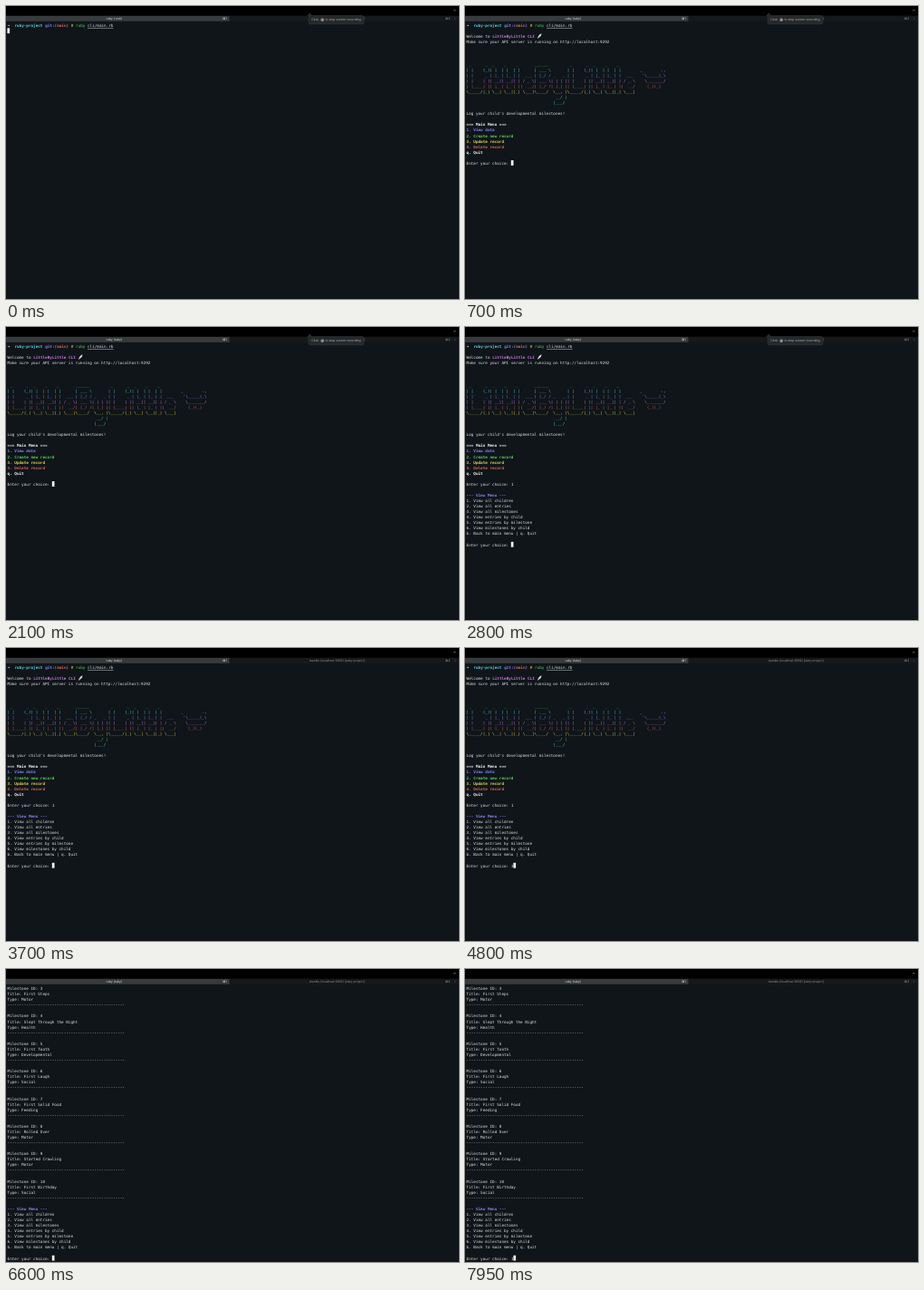
Recreate the animation shown at these times as an HTML page. Size 500 px wide and 323 px high, loop 8 s.

```html
<!DOCTYPE html>
<html lang="en">
<head>
<meta charset="utf-8">
<title>Terminal session</title>
<style>
  html, body { margin: 0; width: 100%; height: 100%; overflow: hidden; background: #0f1519; }
  svg { display: block; width: 100vw; height: 100vh; }
  text { white-space: pre; text-rendering: geometricPrecision; }
  .term { font: 4.319px "DejaVu Sans Mono", monospace; fill: #e0e3e3; }
  .bold { font-weight: bold; }
  .ui { font: 3.35px Inter, sans-serif; fill: #e8eaeb; text-anchor: middle; }
  .idle { fill: #94999c; }
</style>
</head>
<body>
<svg id="stage" viewBox="0 0 500 323">
  <rect width="500" height="323" fill="#0f1519"/>
  <rect width="500" height="10.8" fill="#000"/>
  <rect y="10.8" width="500" height="6" fill="#16191c"/>
  <rect y="10.9" width="246.5" height="5.9" fill="#373b3d"/>
  <path d="M494 5.4l1.3-1.3 1.3 1.3" fill="none" stroke="#aaa" stroke-width=".7"/>
  <g class="ui">
    <text id="tab" x="119.3" y="15.2"></text>
    <text x="241.3" y="15.2">⌘1</text>
    <text class="idle" x="365.5" y="15.2">bundle (localhost:9292) [ruby-project]</text>
    <text class="idle" x="487.5" y="15.2">⌘2</text>
  </g>
  <path d="M495.6 12.8v2.4" stroke="#4c5154" stroke-width=".6"/>
  <g id="tip">
    <path d="M332.8 10.6l2.4-2.6 2.4 2.6H393a2 2 0 0 1 2 2V18a2 2 0 0 1-2 2H336a2 2 0 0 1-2-2V10.6z"
      fill="#26292b" stroke="#3c4042" stroke-width=".4"/>
    <g class="ui" style="font-size:3.4px;fill:#b4b6b7;text-anchor:start">
      <text x="337.3" y="16.4">Click</text>
      <text x="352.4" y="16.4">to stop screen recording</text>
    </g>
    <circle cx="349.2" cy="15.2" r="1.5" fill="none" stroke="#ddd" stroke-width=".5"/>
    <circle cx="349.2" cy="15.2" r=".8" fill="#ddd"/>
  </g>
  <rect id="cursor" width="2.7" height="5.8" fill="#f4f6f6"/>
</svg>
<script>
const LOOP = 8000, LEFT = 1.6, COL = 2.6, ROW = 6.07;
const WHITE = '#f2f4f4', CYAN = '#5fd0e0', BLUE = '#8585ee', PINK = '#c878dc',
  RED = '#d4645c', YELLOW = '#dcd64c', GREEN = '#5ccc62';
const stage = document.getElementById('stage'), cursor = document.getElementById('cursor');
const tab = document.getElementById('tab'), tip = document.getElementById('tip');

function make(name, attrs, parent) {
  const node = document.createElementNS('http://www.w3.org/2000/svg', name);
  for (const key in attrs) node.setAttribute(key, attrs[key]);
  return parent.appendChild(node);
}
const layer = () => make('g', { class: 'term' }, stage);

function put(parent, row, col, string, color, bold) {
  const node = make('text', { x: LEFT + col * COL, y: 23.1 + row * ROW }, parent);
  node.textContent = string;
  if (color) node.style.fill = color;
  if (bold) node.classList.add('bold');
  return node;
}

function putViewMenu(parent, row) {
  put(parent, row, 0, '--- View Menu ---', BLUE, true);
  ['1. View all children', '2. View all entries', '3. View all milestones',
    '4. View entries by child', '5. View entries by milestone',
    '6. View milestones by child', 'b. Back to main menu | q. Quit', '',
    'Enter your choice: '].forEach((line, i) => put(parent, row + 1 + i, 0, line));
}

const prompt = layer();
put(prompt, 0, 0, '➜', WHITE, true);
put(prompt, 0, 3, 'ruby-project', CYAN, true);
put(prompt, 0, 16, 'git:(', BLUE, true);
put(prompt, 0, 21, 'main', RED, true);
put(prompt, 0, 25, ')', BLUE, true);
put(prompt, 0, 27, '#', YELLOW);
put(prompt, 0, 29, 'ruby', GREEN);
put(prompt, 0, 34, 'cli/main.rb').style.textDecoration = 'underline';

const main = layer();
put(main, 2, 0, 'Welcome to');
put(main, 2, 11, 'LittleByLittle CLI', PINK, true);
make('path', { d: 'M79.8 35.2l2.4-3.7 2.4-1.3-.8 2.7-3 2.7z', fill: '#d5dae0' }, main);
make('path', { d: 'M79.8 35.4l.9-1.6.7.8z', fill: RED }, main);
put(main, 3, 0, 'Make sure your API server is running on http://localhost:9292');

const banner = String.raw`
 _      _  _    _    _       ______         _      _  _    _    _
| |    (_)| |  | |  | |      | ___ \       | |    (_)| |  | |  | |        _        .,
| |     _ | |_ | |_ | |  ___ | |_/ / _   _ | |     _ | |_ | |_ | |  ___    '\_____(_\
| |    | || __|| __|| | / _ \| ___ \| | | || |    | || __|| __|| | / _ \    \_______/
| |____| || |_ | |_ | ||  __/| |_/ /| |_| || |____| || |_ | |_ | ||  __/     (_)(_)
\_____/|_| \__| \__||_| \___|\____/  \__, |\_____/|_| \__| \__||_| \___|
                                      __/ |
                                     |___/`.slice(1).split('\n');
const rainbow = [GREEN, CYAN, BLUE, PINK, RED, YELLOW];
banner.forEach((line, i) => put(main, 7 + i, 0, line, rainbow[i % rainbow.length]));

put(main, 16, 0, "Log your child's developmental milestones!");
[['=== Main Menu ===', WHITE], ['1. View data', BLUE], ['2. Create new record', GREEN],
  ['3. Update record', YELLOW], ['4. Delete record', RED], ['q. Quit', WHITE]]
  .forEach(([line, color], i) => put(main, 18 + i, 0, line, color, true));
put(main, 25, 0, 'Enter your choice: ');

const viewMenu = layer();
putViewMenu(viewMenu, 27);

const list = layer();
[['First Steps', 'Motor'], ['Slept Through the Night', 'Health'],
  ['First Tooth', 'Developmental'], ['First Laugh', 'Social'],
  ['First Solid Food', 'Feeding'], ['Rolled Over', 'Motor'],
  ['Started Crawling', 'Motor'], ['First Birthday', 'Social']].forEach(([title, type], i) => {
  ['Milestone ID: ' + (i + 3), 'Title: ' + title, 'Type: ' + type, '-'.repeat(50)]
    .forEach((line, j) => put(list, i * 5 + j, 0, line));
});
putViewMenu(list, 40);

const typed = layer();
const answers = [[25, '1', 2300], [36, '3', 4650], [49, '1', 7800]]
  .map(([row, key, at]) => ({ at, node: put(typed, row, 19, key) }));

// start time, cursor row, cursor column
const steps = [[0, 1, 0], [550, 25, 19], [2300, 25, 20], [2750, 36, 19],
  [4650, 36, 20], [6350, 49, 19], [7800, 49, 20]];
const LIST_AT = 6350;
const show = (node, on) => { node.style.display = on ? '' : 'none'; };

function draw(t) {
  const [, row, col] = steps.filter(step => step[0] <= t).pop();
  cursor.setAttribute('x', LEFT - 0.2 + col * COL);
  cursor.setAttribute('y', 18.3 + row * ROW);
  const listed = t >= LIST_AT;
  show(prompt, !listed);
  show(main, t >= 550 && !listed);
  show(viewMenu, t >= 2750 && !listed);
  show(list, listed);
  answers.forEach(({ at, node }) => show(node, t >= at && (at > LIST_AT) === listed));
  tab.textContent = t < 200 ? 'ruby (-zsh)' : 'ruby (ruby)';
  tip.style.opacity = Math.max(0, Math.min(1, (3250 - t) / 250));
}

const start = performance.now();
function tick() {
  draw((performance.now() - start) % LOOP);
  requestAnimationFrame(tick);
}
tick();
</script>
</body>
</html>
```
